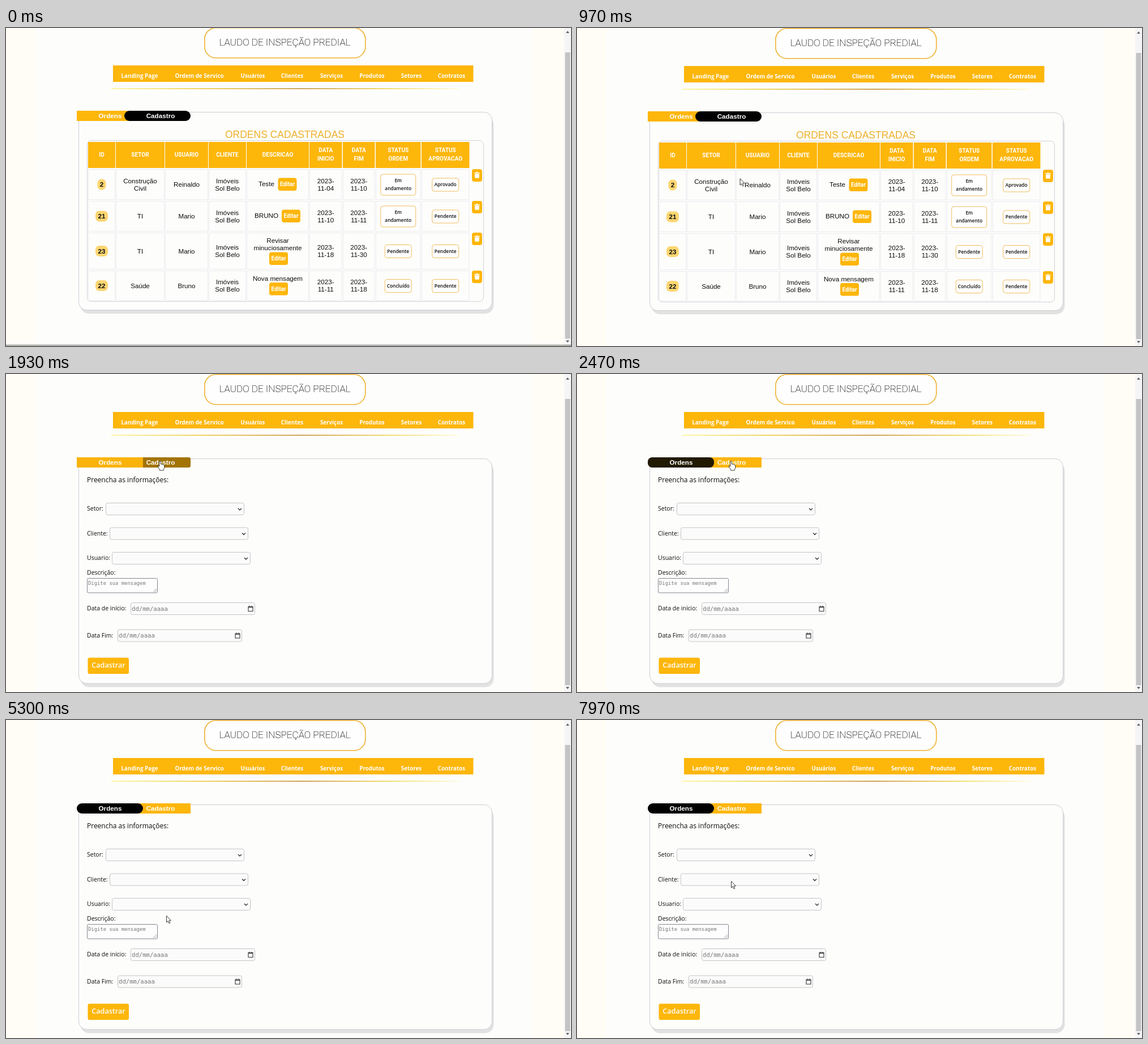
Recreate the animation shown at these times as an HTML page. Size 998 by 561 pixels, loop 8000 ms.

```html
<!DOCTYPE html>
<html lang="pt">
<head>
<meta charset="utf-8">
<title>Laudo de Inspeção Predial</title>
<style>
  :root { --gold: #fdb60a; }
  html, body { margin: 0; width: 100%; height: 100%; overflow: hidden; background: #fffdf5; }
  #stage { position: relative; width: 998px; height: 561px; overflow: hidden; }
  #page, #art { position: absolute; left: 0; top: 0; width: 998px; height: 561px; }
  #page, .orders, .form, .tab, .label, .edge, .cursor, .arrow, .hand {
    animation: 8s step-end infinite;
  }
  #page { animation-name: settle; }
  .orders { animation-name: leave; }
  .form { animation-name: enter; }
  .edge { animation-name: edge; }

  text { fill: #0c0c0c; text-anchor: middle; }
  .left { text-anchor: start; }
  .title { font: 100 17.15px Roboto, sans-serif; fill: #222; stroke: #222; stroke-width: .2px; }
  .nav { font: 700 9.8px "Open Sans", sans-serif; fill: #fff; }
  .heading { font: 17.5px "Liberation Sans", Arial, sans-serif; fill: #eeb02a; }
  .head { font: 700 10.1px Roboto, sans-serif; fill: #fff; }
  .cell { font: 11.67px "Liberation Sans", Arial, sans-serif; }
  .id { font: 700 11.67px "Liberation Sans", Arial, sans-serif; }
  .edit { font: 700 10px Roboto, sans-serif; fill: #fff; }
  .status { font: 600 8.4px "Open Sans", sans-serif; }
  .intro { font: 500 12px "Open Sans", sans-serif; }
  .field { font: 500 10.5px "Open Sans", sans-serif; }
  .hint { font: 8.9px "DejaVu Sans Mono", monospace; fill: #777; }
  .date { font: 10.6px "DejaVu Sans Mono", monospace; fill: #777; }
  .submit { font: 600 12.6px "Open Sans", sans-serif; fill: #fff; }

  .gold { fill: var(--gold); }
  .shadow { fill: #e2e2e3; }
  .panel { fill: #fdfdfc; stroke: #cdcdd2; }
  .grid { fill: none; stroke: #ebebf0; }
  .frame { fill: none; stroke: #d2d2da; }
  .badge { fill: #fdd672; }
  .pill { fill: #fff; stroke: #f0bc5c; }
  .input { fill: #fbfbfb; stroke: #c4c4c8; }
  .area { fill: #fdfdfd; stroke: #85858f; }
  .line { fill: none; stroke: #333; stroke-width: 1.4; }

  .tab {
    position: absolute; top: 147px; width: 117px; height: 18px;
    animation-timing-function: linear;
  }
  .tab.first { left: 125px; z-index: 1; animation-name: firstTab; }
  .tab.second { left: 209px; animation-name: secondTab, secondLayer; animation-timing-function: linear, step-end; }
  .label {
    position: absolute; top: 147px; z-index: 3; width: 80px; text-align: center; color: #fff;
    font: 700 11.7px/18px "Liberation Sans", Arial, sans-serif;
  }

  .cursor { position: absolute; left: 0; top: 0; z-index: 5; animation-name: travel; animation-timing-function: linear; overflow: visible; }
  .arrow { animation-name: arrow; }
  .hand { animation-name: hand; }

  @keyframes settle { 0% { transform: translateY(-1px); } .375%, 100% { transform: none; } }
  @keyframes leave { 0% { visibility: visible; } 23.5%, 100% { visibility: hidden; } }
  @keyframes enter { 0% { visibility: hidden; } 23.5%, 100% { visibility: visible; } }
  @keyframes edge { 0% { visibility: visible; } 10%, 100% { visibility: hidden; } }
  @keyframes firstTab {
    0% { background: var(--gold); border-radius: 0; }
    23.75% { background: var(--gold); border-radius: 0; animation-timing-function: ease; }
    36.25%, 100% { background: #000; border-radius: 9px; }
  }
  @keyframes secondTab {
    0% { background: #000; border-radius: 9px; }
    19.5% { background: #000; border-radius: 9px; animation-timing-function: ease; }
    32%, 100% { background: var(--gold); border-radius: 0; }
  }
  @keyframes secondLayer { 0% { z-index: 2; } 23.5%, 100% { z-index: 0; } }
  @keyframes arrow { 0% { visibility: visible; } 19.3% { visibility: hidden; } 34.8%, 100% { visibility: visible; } }
  @keyframes hand { 0% { visibility: hidden; } 19.3% { visibility: visible; } 34.8%, 100% { visibility: hidden; } }
  @keyframes travel {
    0%, 5% { transform: translate(470px, 566px); }
    9.125% { transform: translate(352px, 370px); animation-timing-function: ease-out; }
    16.625% { transform: translate(239.5px, 187px); }
    19.3% { transform: translate(262px, 164px); animation-timing-function: ease-out; }
    22%, 33.75% { transform: translate(272px, 154px); animation-timing-function: ease-out; }
    41.625% { transform: translate(273px, 249px); }
    46.25% { transform: translate(274px, 257px); animation-timing-function: ease-in; }
    52.125% { transform: translate(276px, 319px); animation-timing-function: ease-out; }
    57.5% { transform: translate(282px, 362px); }
    62.5% { transform: translate(283px, 346px); }
    66.25% { transform: translate(283px, 345px); }
    72.9% { transform: translate(281px, 341px); }
    83.4% { transform: translate(281px, 299px); animation-timing-function: ease-out; }
    93.75% { transform: translate(278px, 284px); }
    99.6%, 100% { transform: translate(272px, 284px); }
  }
</style>
</head>
<body>
<div id="stage">
  <div id="page">
    <svg id="art" viewBox="0 0 998 561"></svg>
    <div class="tab first"></div>
    <div class="tab second"></div>
    <div class="label" style="left:144px">Ordens</div>
    <div class="label" style="left:233px">Cadastro</div>
  </div>
  <svg class="cursor" width="20" height="20">
    <path class="arrow" d="M.5.5V12l2.6-2.4 1.9 4.2 1.9-.9L5 8.8h3.4z" fill="#fff" stroke="#222" stroke-width=".9"/>
    <path class="hand" d="M-1.2 9V1.2q0-1.4 1.3-1.4t1.3 1.4V5q2-.8 2.3.6 1.9-.6 2.2.7 1.9-.4 1.9 1.3V11q0 2-1.5 3.4V16H-.4v-1.4L-3.6 10q-.6-1.8.7-2z" fill="#fff" stroke="#222" stroke-width=".9"/>
  </svg>
</div>
<script>
const rect = (x, y, w, h, cls, r = 0) =>
  `<rect x="${x}" y="${y}" width="${w}" height="${h}" rx="${r}" class="${cls}"/>`;

// y is the middle of the capitals
const text = (x, y, str, cls) => `<text x="${x}" y="${y}" dy=".36em" class="${cls}">${str}</text>`;

const lines = (x, y, str, cls, gap) => {
  const parts = str.split("|");
  return parts.map((p, i) => text(x, y + (i - (parts.length - 1) / 2) * gap, p, cls)).join("");
};

const panel = height =>
  rect(131.5, 156, 730, height, "shadow", 15) + rect(128.5, 149.5, 730, height, "panel", 14);

const columns = [
  [145, 48, "ID"], [194, 86, "SETOR"], [281, 76, "USUARIO"], [358, 66, "CLIENTE"],
  [425, 110, "DESCRICAO"], [536, 57.5, "DATA|INICIO"], [595, 56.5, "DATA|FIM"],
  [653, 79.5, "STATUS|ORDEM"], [734, 84.5, "STATUS|APROVACAO"]
];

const client = "Imóveis|Sol Belo";
const rows = [
  { top: 250, h: 54, id: "2", cells: ["Construção|Civil", "Reinaldo", client], dates: ["2023-|11-04", "2023-|11-10"],
    note: [460, 276, "Teste"], edit: [480.5, 265.5], state: ["Em|andamento", "Aprovado"] },
  { top: 306, h: 54, id: "21", cells: ["TI", "Mario", client], dates: ["2023-|11-10", "2023-|11-11"],
    note: [460, 331.5, "BRUNO"], edit: [487, 321.5], state: ["Em|andamento", "Pendente"] },
  { top: 362, h: 65, id: "23", cells: ["TI", "Mario", client], dates: ["2023-|11-18", "2023-|11-30"],
    note: [480, 382.5, "Revisar|minuciosamente"], edit: [465, 396.5], state: ["Pendente", "Pendente"] },
  { top: 429, h: 53, id: "22", cells: ["Saúde", "Bruno", client], dates: ["2023-|11-11", "2023-|11-18"],
    note: [480, 443, "Nova mensagem"], edit: [465, 450], state: ["Concluído", "Pendente"] }
];

const center = i => columns[i][0] + columns[i][1] / 2;

const pill = (x, y, str) => {
  const tall = str.includes("|");
  const w = tall ? 62 : 47, h = tall ? 37 : 23;
  return rect(x - w / 2, y - h / 2, w, h, "pill", 4) + lines(x, y - .5, str, "status", 14.5);
};

const trash = y => rect(823, y, 18, 22, "gold", 4) +
  `<path transform="translate(832 ${y + 5})" fill="#fff" d="M-5 1.2h3L-1.4 0h2.8L2 1.2h3v1.3H-5zM-4.2 3.3h8.4l-.5 6.6q-.1.9-1 .9h-5.4q-.9 0-1-.9z"/>`;

const drawRow = ({ top, h, id, cells, dates, note, edit, state }) => {
  const mid = top + h / 2;
  const badge = id.length > 1 ? 22 : 15;
  return columns.map(([x, w]) => rect(x + .5, top + .5, w - 1, h - 1, "grid")).join("") +
    rect(169 - badge / 2, mid - 9.5, badge, 19, "badge", 7) + text(169, mid, id, "id") +
    cells.map((s, i) => lines(center(i + 1), mid, s, "cell", 13.3)).join("") +
    dates.map((s, i) => lines(center(i + 5), mid, s, "cell", 13.3)).join("") +
    lines(...note, "cell", 13) +
    rect(...edit, 33, 22.5, "gold", 4) + text(edit[0] + 16.5, edit[1] + 11, "Editar", "edit") +
    state.map((s, i) => pill(center(i + 7), mid + .5, s)).join("") +
    trash(top);
};

const orders = panel(349) +
  text(492.5, 188.5, "ORDENS CADASTRADAS", "heading") +
  rect(143.5, 199.5, 700, 284, "frame", 7) +
  columns.map(([x, w, s], i) => rect(x, 202, w, 46, "gold") + lines(center(i), 224, s, "head", 15)).join("") +
  rows.map(drawRow).join("");

const select = (label, x, y) => text(143, y + 10.5, label, "field left") +
  rect(x + .5, y + .5, 244, 21, "input", 3) +
  `<path class="line" d="M${x + 234} ${y + 10}l3 3 3-3"/>`;

const dateInput = (label, x, y) => text(143, y + 10.5, label, "field left") +
  rect(x + .5, y + .5, 219, 21, "input", 3) + text(x + 2, y + 11, "dd/mm/aaaa", "date left") +
  `<path class="line" style="stroke-width:1.1" d="M${x + 208} ${y + 7.5}h8v8h-8zm0 1.2h8m-6-3v2m4-2v2"/>`;

const form = panel(396.5) +
  text(143, 187, "Preencha as informações:", "intro left") +
  select("Setor:", 176, 227) + select("Cliente:", 183, 270.5) + select("Usuario:", 187, 314) +
  text(143, 350, "Descrição:", "field left") +
  rect(143.5, 360.5, 124, 25.5, "area", 2) +
  text(145, 368.5, "Digite sua mensagem", "hint left") +
  `<path d="M260 384.5l6-6m-2.5 6l2.5-2.5" stroke="#777" stroke-width=".8"/>` +
  dateInput("Data de início:", 220, 403) + dateInput("Data Fim:", 197, 450.5) +
  rect(144.5, 500.5, 72.5, 28.5, "gold", 3) + text(181, 513.5, "Cadastrar", "submit");

const menu = [
  [236, "Landing Page"], [341.5, "Ordem de Servico"], [436, "Usuários"], [505.5, "Clientes"],
  [575, "Serviços"], [646.5, "Produtos"], [716, "Setores"], [787, "Contratos"]
];

document.getElementById("art").innerHTML = `
  <defs><linearGradient id="rule">
    <stop offset="0" stop-color="#fdf6a8"/><stop offset=".25" stop-color="#f0d568"/>
    <stop offset=".55" stop-color="#cfa55c"/><stop offset=".8" stop-color="#f3de74"/>
    <stop offset="1" stop-color="#fffce0"/>
  </linearGradient></defs>
  <rect x="52" y="-2" width="878" height="566" fill="#fdfdfc"/>
  <rect x="350.8" y=".8" width="284" height="53" rx="20" fill="#fefefe" stroke="#eeb130" stroke-width="1.6"/>
  ${text(492.5, 26, "LAUDO DE INSPEÇÃO PREDIAL", "title")}
  ${rect(189, 67, 636.5, 29, "gold")}
  ${menu.map(([x, s]) => text(x, 85.2, s, "nav")).join("")}
  <rect x="186" y="107" width="615" height="2" fill="url(#rule)"/>
  <g class="orders">${orders}</g>
  <g class="form">${form}</g>
  <rect x="986" y="-2" width="12" height="566" fill="#f5f5f7"/>
  <rect x="987.5" y="44" width="9" height="505" fill="#c3c3c5"/>
  <path d="M989 10l3-4 3 4zM989 552l3 4 3-4z" fill="#666"/>
  <rect class="edge" x="0" y="560" width="998" height="2" fill="#555"/>`;
</script>
</body>
</html>
```
